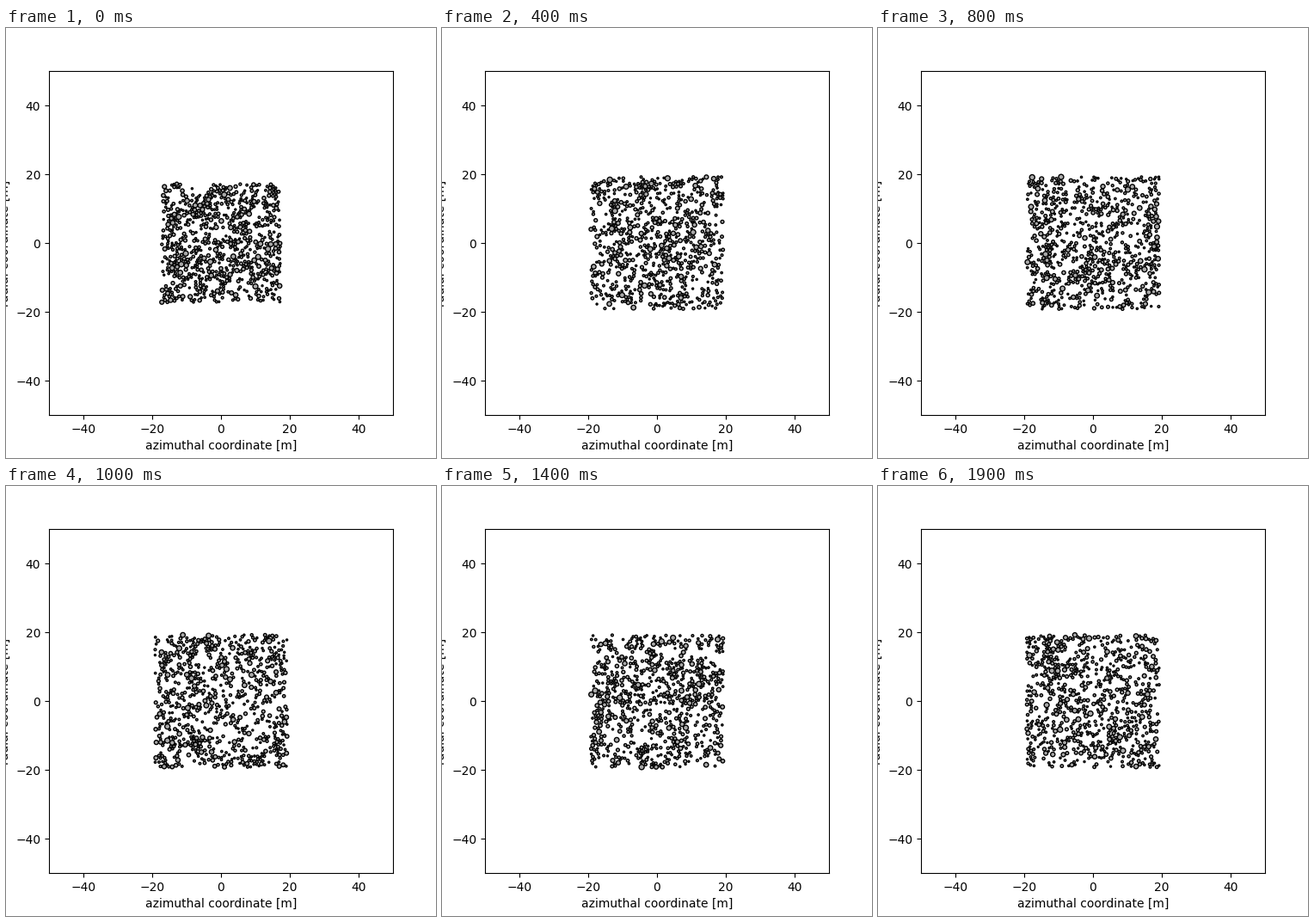
Animation of 500 by 500 pixels, one loop 2000 ms. Source, as a matplotlib script:

```python
import numpy as np
import matplotlib.pyplot as plt
from matplotlib.animation import FuncAnimation
from matplotlib.collections import EllipseCollection

FRAMES = 20
INTERVAL = 100
COUNT = 720
HALF = 19.2        # half width of the shearing patch
START_HALF = 17.2  # particles begin a little inside it
R_MIN, R_MAX = 0.25, 0.77

rng = np.random.default_rng(7)


def power_law(u, low, high, slope=-3):
    k = slope + 1
    return (low**k + u * (high**k - low**k)) ** (1 / k)


def wrap(v):
    return (v + HALF) % (2 * HALF) - HALF


def separate(pos, half, steps=12):
    """Push overlapping discs apart."""
    reach = radii[:, None] + radii[None, :] + 0.1
    for _ in range(steps):
        delta = pos[:, None, :] - pos[None, :, :]
        dist = np.hypot(delta[..., 0], delta[..., 1])
        np.fill_diagonal(dist, 1e3)
        push = np.clip(reach - dist, 0, None) / (2 * np.maximum(dist, 1e-6))
        pos = np.clip(pos + (delta * push[..., None]).sum(axis=1), -half, half)
    return pos


radii = power_law(rng.random(COUNT), R_MIN, R_MAX)
azimuth0, radial0 = rng.uniform(-START_HALF, START_HALF, (2, COUNT))
drift = rng.normal(0, 9, (2, COUNT))
swing = rng.uniform(2, 6, COUNT)
phase = rng.uniform(0, 2 * np.pi, COUNT)


def positions(i):
    """Keplerian shear, epicycles and random drift in a periodic patch."""
    angle = phase + 1.3 * i
    radial = radial0 + drift[0] * i + swing * (np.cos(angle) - np.cos(phase))
    azimuth = (azimuth0 + drift[1] * i - 1.5 * radial0 * i
               - 2 * swing * (np.sin(angle) - np.sin(phase)))
    pos = np.column_stack([wrap(azimuth), wrap(radial)])
    return separate(pos, HALF if i else START_HALF)


track = [positions(i) for i in range(FRAMES)]

fig = plt.figure(figsize=(5, 5), dpi=100)
ax = fig.add_axes([0.1, 0.1, 0.8, 0.8])
ax.set(xlim=(-50, 50), ylim=(-50, 50),
       xlabel="azimuthal coordinate [m]", ylabel="radial coordinate [m]")
ticks = range(-40, 41, 20)
ax.set_xticks(ticks)
ax.set_yticks(ticks)

discs = EllipseCollection(
    2 * radii, 2 * radii, np.zeros(COUNT), units="xy",
    offsets=track[0], offset_transform=ax.transData,
    facecolors="darkgray", edgecolors="black", linewidths=1)
ax.add_collection(discs, autolim=False)


def update(i):
    discs.set_offsets(track[i])
    return (discs,)


anim = FuncAnimation(fig, update, frames=FRAMES, interval=INTERVAL,
                     repeat=True, repeat_delay=0)
plt.show()
```
